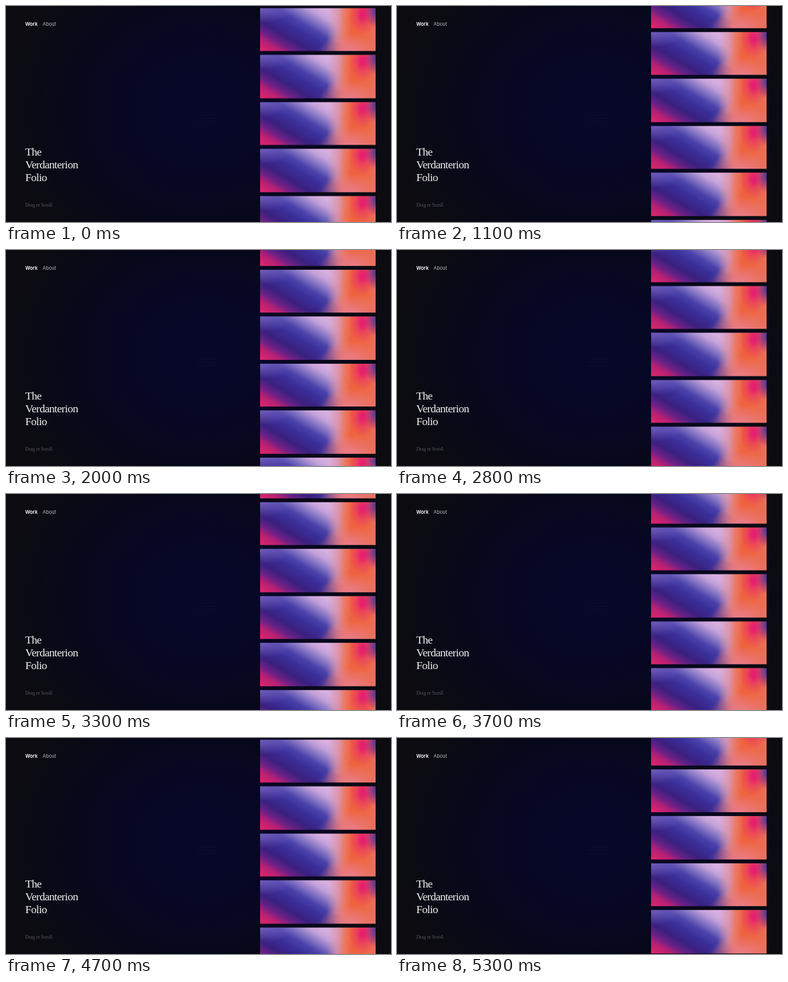
Animation, 600 px wide and 338 px high, one loop 5.4 s. Source, as an HTML page:

```html
<!DOCTYPE html>
<html lang="en">
<head>
<meta charset="utf-8">
<title>Gallery</title>
<style>
  html, body { margin: 0; width: 100%; height: 100%; overflow: hidden; }
  #stage {
    position: relative; width: 600px; height: 338px; overflow: hidden;
    background: radial-gradient(ellipse 330px 290px at 305px 165px,
      #070729 0, #070725 35%, #08081a 65%, #0b0b12 90%, #0c0c10);
  }
  svg { position: absolute; inset: 0; }
  .title { font: 17.5px/1 "Liberation Serif", serif; letter-spacing: -.7px; fill: #f0f0f2; }
  .hint { font: 8px/1 "Liberation Serif", serif; letter-spacing: -.27px; fill: #55555e; }
  .nav { font: 7.5px/1 Inter, sans-serif; fill: #b6b6bb; }
  .active { font-weight: 600; fill: #fff; }
  #strip { position: absolute; left: 395.5px; top: 0; width: 180px; will-change: transform; }
  .card {
    height: 67.6px; margin-bottom: 6px;
    background:
      radial-gradient(ellipse 18px 26px at 181px 5px, #5c3a94 15%, #8a3488a0 55%, #b0307000),
      radial-gradient(ellipse 22px 32px at 160px 10px, #e6206e 15%, #e8306890 50%, #ee503c00),
      radial-gradient(ellipse 46px 30px at 140px 68px, #e97a80 20%, #e9787800),
      radial-gradient(ellipse 26px 22px at 112px 72px, #4a3a98 10%, #5a429880 50%, #7a509000),
      radial-gradient(ellipse 55px 24px at 0 0, #8a72c8b0, #6a5abc00),
      linear-gradient(93deg, #e0909000 106px, #de8fa0c0 122px, #ea7a68 132px, #f0623c 144px, #ee6844 165px, #e8705c),
      linear-gradient(31deg, #e2266a 0, #b82074 11%, #6e2086 18%, #3a207f 27%, #3a2f9a 38.5%,
        #4a42aa 47%, #8878c6 56%, #c4a2da 64%, #d8b0e0 71%);
  }
</style>
</head>
<body>
<div id="stage">
  <svg width="600" height="338">
    <g class="nav">
      <text class="active" x="30" y="31">Work</text>
      <text x="57" y="31">About</text>
    </g>
    <g class="title">
      <text x="30" y="234">The</text>
      <text x="30" y="253.7">Verdanterion</text>
      <text x="30" y="274">Folio</text>
    </g>
    <text class="hint" x="30" y="313.5">Drag or Scroll</text>
    <g stroke="#1a1a3a" stroke-dasharray="1 3.4">
      <path d="M304 170.5h26M298 175.5h31M297 180.5h30"/>
    </g>
  </svg>
  <div id="strip"></div>
</div>
<script>
  const LOOP = 5400, STEP = 100, PITCH = 73.6;
  // Scroll position in px at each time in ms
  const keys = [[0, 3], [1100, -106.9], [2000, -190.3], [2800, -238.4],
                [3700, -316], [4300, -347.2], [5300, -392.9]];
  const strip = document.getElementById('strip');
  strip.innerHTML = '<div class="card"></div>'.repeat(6);

  function slope(i) {
    const a = keys[Math.max(i - 1, 0)], b = keys[Math.min(i + 1, keys.length - 1)];
    return (b[1] - a[1]) / (b[0] - a[0]);
  }

  // Cubic Hermite curve through the keys
  function scrollAt(t) {
    let i = 0;
    while (i < keys.length - 2 && t >= keys[i + 1][0]) i++;
    const [t0, y0] = keys[i], [t1, y1] = keys[i + 1];
    const span = t1 - t0, u = Math.min((t - t0) / span, 1), v = 1 - u;
    return y0 * v * v * (1 + 2 * u) + y1 * u * u * (3 - 2 * u)
      + span * u * v * (slope(i) * v - slope(i + 1) * u);
  }

  function draw(now) {
    const t = Math.floor((now % LOOP) / STEP) * STEP;
    const top = ((scrollAt(t) % PITCH) + PITCH) % PITCH - PITCH;
    strip.style.transform = `translateY(${top.toFixed(2)}px)`;
    requestAnimationFrame(draw);
  }
  draw(performance.now());
</script>
</body>
</html>
```
